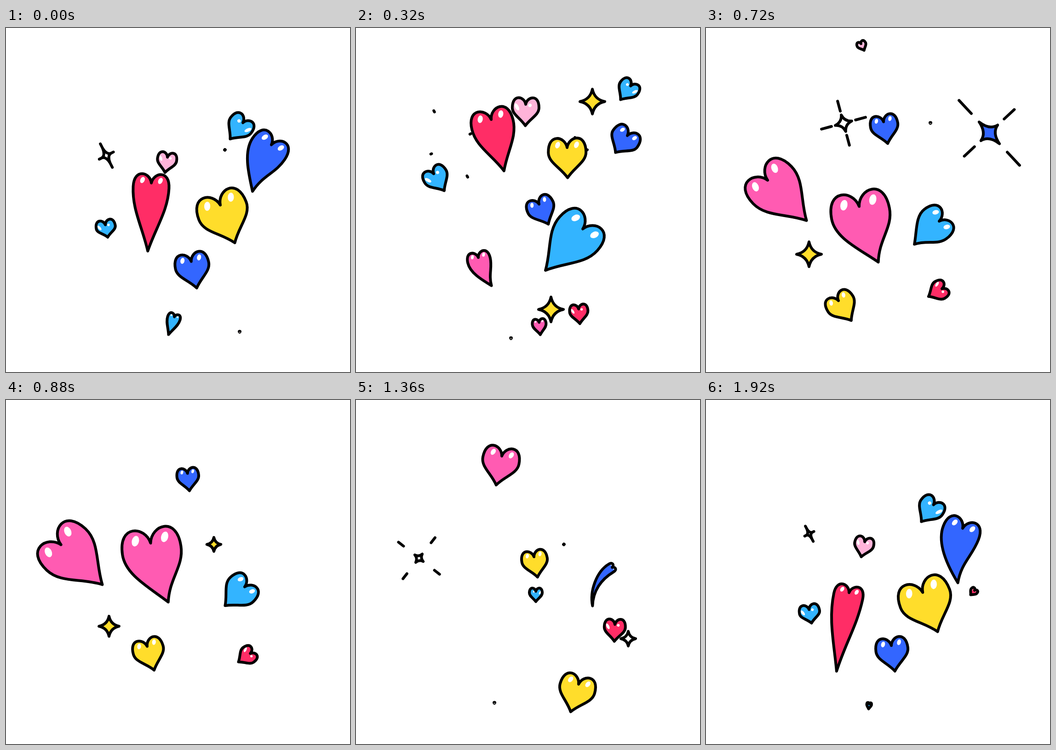
An HTML page with a canvas that plays this animation: 748x748 px, repeating every 2 s.

```html
<!DOCTYPE html>
<html lang="en">
<head>
<meta charset="utf-8">
<title>Hearts</title>
<style>
html, body { margin: 0; width: 100%; height: 100%; overflow: hidden; background: #fff }
canvas { display: block; width: 100vw; height: 100vh }
</style>
</head>
<body>
<canvas width="748" height="748"></canvas>
<script>
const ctx = document.querySelector('canvas').getContext('2d');
const LOOP = 2000, STEP = 80;
const RED = '#ff2d66', PINK = '#ff5bb2', ROSE = '#ffb3d9', BLUE = '#3366ff';
const SKY = '#33b4ff', YELLOW = '#ffdd2b', WHITE = '#fff';

// Highlight: distance from the notch, length, width and turn, in heart sizes
const OVAL = { x: .5, y: -.14, long: .18, wide: .12 };
const LONG = { x: .66, y: .2, long: .29, wide: .13, turn: .5 };
const DOT = { x: .32, y: .07, long: .13, wide: .13 };

// Pose: time, notch x, y, half width, tilt in degrees, length per half width, bend in degrees
const REST = [0, 0, 0, 1, 0, 1.6, 0];
const hearts = [];
const heart = (color, left, right, ...poses) =>
  hearts.push({ color, left, right, poses: poses.map(p => REST.map((v, i) => p[i] ?? v)) });

heart(ROSE, LONG, DOT,
  [1440, 305, 520], [1680, 325, 394, 21, 23], [2000, 351, 281, 21, 9],
  [2320, 369, 166, 29, 1], [2720, 337, 34, 10, -25]);
heart(RED, OVAL, OVAL,
  [1600, 236, 712], [1680, 247, 697, 7, 27], [1920, 311, 419, 32, 9, 5.4, 3], [2000, 316, 337, 39, 3, 3.8],
  [2320, 294, 199, 46, -14, 2.5], [2550, 292, 170, 40, -12, 2.4]);
heart(BLUE, OVAL, OVAL,
  [1120, 592, 567, 6, -17], [1360, 557, 364, 10, 27, 9.4, 32], [1680, 578, 437, 34, -89, 2.2, 22],
  [1920, 558, 279, 41, 5, 2.9, 16], [2000, 577, 254, 42, 22, 2.6, 12],
  [2320, 590, 234, 32, 35, 1.4], [2538, 616, 218, 36, 33, 1.4]);
heart(BLUE, OVAL, OVAL,
  [1680, 398, 582], [1920, 403, 534, 35, -8], [2320, 398, 383, 30, -25],
  [2720, 386, 204, 30, -11], [3120, 415, 108, 11]);
heart(YELLOW, OVAL, OVAL,
  [1200, 455, 690], [1360, 484, 618, 39, 16], [1680, 489, 518, 58, -10],
  [2000, 466, 385, 55, -21], [2320, 459, 260, 41, -1], [2720, 488, 206]);
heart(SKY, OVAL, OVAL,
  [1880, 352, 675], [2000, 366, 628, 14, 18, 2.9], [2320, 493, 437, 55, 42, 2.2],
  [2720, 507, 420, 40, 47, 1.84, 6], [2895, 520, 405, 36, 46]);
heart(SKY, DOT, LONG,
  [1220, 375, 480], [1360, 391, 416, 14], [1680, 438, 299, 26, 23],
  [2000, 515, 206, 28, 38], [2320, 597, 126, 23, 36], [2560, 628, 82]);
heart(SKY, LONG, DOT,
  [1360, 301, 658], [1680, 246, 540, 26, -14], [2000, 216, 428, 21, -11, 1.3],
  [2320, 169, 317, 27, -32], [2600, 105, 240]);
heart(PINK, OVAL, OVAL,
  [120, 345, 650], [320, 266, 499, 25, -25, 2.7, 12], [720, 134, 331, 58, -44, 2.1], [1120, 119, 318, 62, -46, 2]);
heart(PINK, OVAL, OVAL,
  [240, 405, 675], [320, 398, 640, 15, -6, 1.8], [720, 333, 388, 64, -19, 2, 8],
  [1120, 298, 212, 53, -7, 2.1, 6], [1360, 317, 122, 40, 11], [1560, 335, 105]);
heart(YELLOW, OVAL, OVAL,
  [320, 337, 674], [720, 288, 593, 32, -33], [1120, 355, 436, 30, 15],
  [1360, 387, 341, 28, -10], [1680, 353, 253, 25, -51], [1860, 335, 205]);
heart(RED, LONG, DOT,
  [0, 508, 660], [320, 484, 611, 20, -5], [720, 513, 567, 21, 60], [1120, 558, 526, 18, 28],
  [1360, 563, 488, 23, 2], [1680, 567, 438, 21, 15], [1920, 584, 414, 8, 42]);

const star = (x, y, start, fill = YELLOW, size = 27) => ({ x, y, start, fill, size });
const twinkles = [
  star(476, 265, 0), star(514, 160, 80), star(424, 612, 80),
  star(224, 492, 440), star(452, 314, 800), star(592, 519, 1120, WHITE, 16)
];

const easeOut = p => 1 - (1 - p) ** 2;
const burst = (x, y, start, angle, more) =>
  ({ x, y, start, angle, time: 280, reach: 59, ratio: 1, fill: WHITE, dx: 0, dy: 0, ease: easeOut, ...more });
const bursts = [
  burst(299, 207, 552, 75),
  burst(616, 228, 538, 47, { reach: 110, ratio: .77, fill: BLUE }),
  burst(517, 411, 896, 50),
  burst(137, 344, 1150, 38, { time: 263 }),
  burst(252, 348, 1680, 63, { time: 660, dx: -46, dy: -96, reach: 85, ratio: .6, ease: p => p ** 1.5 })
];

const rad = deg => deg * Math.PI / 180;
const turn = (x, y, a) => [x * Math.cos(a) - y * Math.sin(a), x * Math.sin(a) + y * Math.cos(a)];

// Smooth curve through the poses
function poseAt(poses, t) {
  let i = 0;
  while (i < poses.length - 2 && t >= poses[i + 1][0]) i++;
  const a = poses[i], b = poses[i + 1], before = poses[i - 1] || a, after = poses[i + 2] || b;
  const h = b[0] - a[0], s = (t - a[0]) / h, s2 = s * s, s3 = s2 * s;
  return a.map((v, j) => {
    const va = (b[j] - before[j]) / (b[0] - before[0]) * h;
    const vb = (after[j] - v) / (after[0] - a[0]) * h;
    return v * (2 * s3 - 3 * s2 + 1) + va * (s3 - 2 * s2 + s) + b[j] * (3 * s2 - 2 * s3) + vb * (s3 - s2);
  });
}

// The lobes lean with the bend, the tail leans against it
function heartPath(w, len, bend) {
  const path = new Path2D();
  const lobe = (x, y) => turn(x * w, y * w, bend);
  const tail = dir => {
    const [x, y] = turn(dir * .38 * w, -.35 * len, -bend);
    return [x, y + len];
  };
  const flank = .25 + .33 * len / w;
  path.moveTo(0, 0);
  path.bezierCurveTo(...lobe(-.1, -.6), ...lobe(-1, -.8), ...lobe(-1, .25));
  path.bezierCurveTo(...lobe(-1, flank), ...tail(-1), 0, len);
  path.bezierCurveTo(...tail(1), ...lobe(1, flank), ...lobe(1, .25));
  path.bezierCurveTo(...lobe(1, -.8), ...lobe(.1, -.6), 0, 0);
  path.closePath();
  return path;
}

function shine({ x, y, long, wide, turn: side }, dir, w, bend) {
  ctx.beginPath();
  ctx.ellipse(...turn(dir * x * w, y * w, bend), wide * w, long * w, bend + (side ? dir * side : .4), 0, 7);
  ctx.fill();
}

function drawHeart({ color, left, right, poses }, t) {
  const [, x, y, size, tilt, stretch, lean] = poseAt(poses, t);
  const w = Math.max(size, 1), bend = rad(lean), path = heartPath(w, w * stretch, bend);
  ctx.save();
  ctx.translate(x, y);
  ctx.rotate(rad(tilt));
  ctx.fillStyle = color;
  ctx.fill(path);
  ctx.save();
  ctx.clip(path);
  ctx.fillStyle = WHITE;
  if (w > 7) {
    shine(left, -1, w, bend);
    shine(right, 1, w, bend);
  }
  ctx.restore();
  ctx.stroke(path);
  ctx.restore();
}

function drawStar(a, b, fill) {
  const c = .17 * Math.min(a, b);
  ctx.beginPath();
  ctx.moveTo(a, 0);
  ctx.quadraticCurveTo(c, c, 0, b);
  ctx.quadraticCurveTo(-c, c, -a, 0);
  ctx.quadraticCurveTo(-c, -c, 0, -b);
  ctx.quadraticCurveTo(c, -c, a, 0);
  ctx.closePath();
  ctx.fillStyle = fill;
  ctx.fill();
  ctx.stroke();
}

function drawTwinkle({ x, y, fill, size }, p) {
  const r = Math.max(1, size * Math.min(1, 1.3 * Math.sin(Math.PI * p)));
  ctx.save();
  ctx.translate(x, y);
  drawStar(r, r, fill);
  ctx.restore();
}

// A star that shrinks while four dashes fly off its points
function drawBurst({ x, y, dx, dy, angle, reach, ratio, fill, ease }, p) {
  const wave = Math.sin(Math.PI * p), drift = easeOut(p);
  const core = Math.max(1, reach * Math.min(.33 * wave, .6 * ease(p)));
  ctx.save();
  ctx.translate(x + dx * drift, y + dy * drift);
  ctx.rotate(rad(angle));
  if (p < .9) drawStar(core, core * ratio, fill);
  for (let i = 0; i < 4; i++) {
    const r = i % 2 ? reach * ratio : reach, far = r * ease(p);
    ctx.beginPath();
    ctx.moveTo(Math.max(far - r * .4 * wave, far * .4), 0);
    ctx.lineTo(far, 0);
    ctx.stroke();
    ctx.rotate(Math.PI / 2);
  }
  ctx.restore();
}

function draw(t) {
  const since = start => (t - start + LOOP) % LOOP;
  ctx.fillStyle = WHITE;
  ctx.fillRect(0, 0, 748, 748);
  ctx.lineWidth = 6;
  ctx.lineCap = ctx.lineJoin = 'round';
  for (const s of twinkles) if (since(s.start) <= 560) drawTwinkle(s, since(s.start) / 560);
  for (const b of bursts) if (since(b.start) <= b.time) drawBurst(b, since(b.start) / b.time);
  for (const h of hearts) {
    const start = h.poses[0][0], now = start + since(start);
    if (now <= h.poses.at(-1)[0]) drawHeart(h, now);
  }
}

function tick() {
  draw(Math.floor(performance.now() % LOOP / STEP) * STEP);
  requestAnimationFrame(tick);
}
tick();
</script>
</body>
</html>
```
